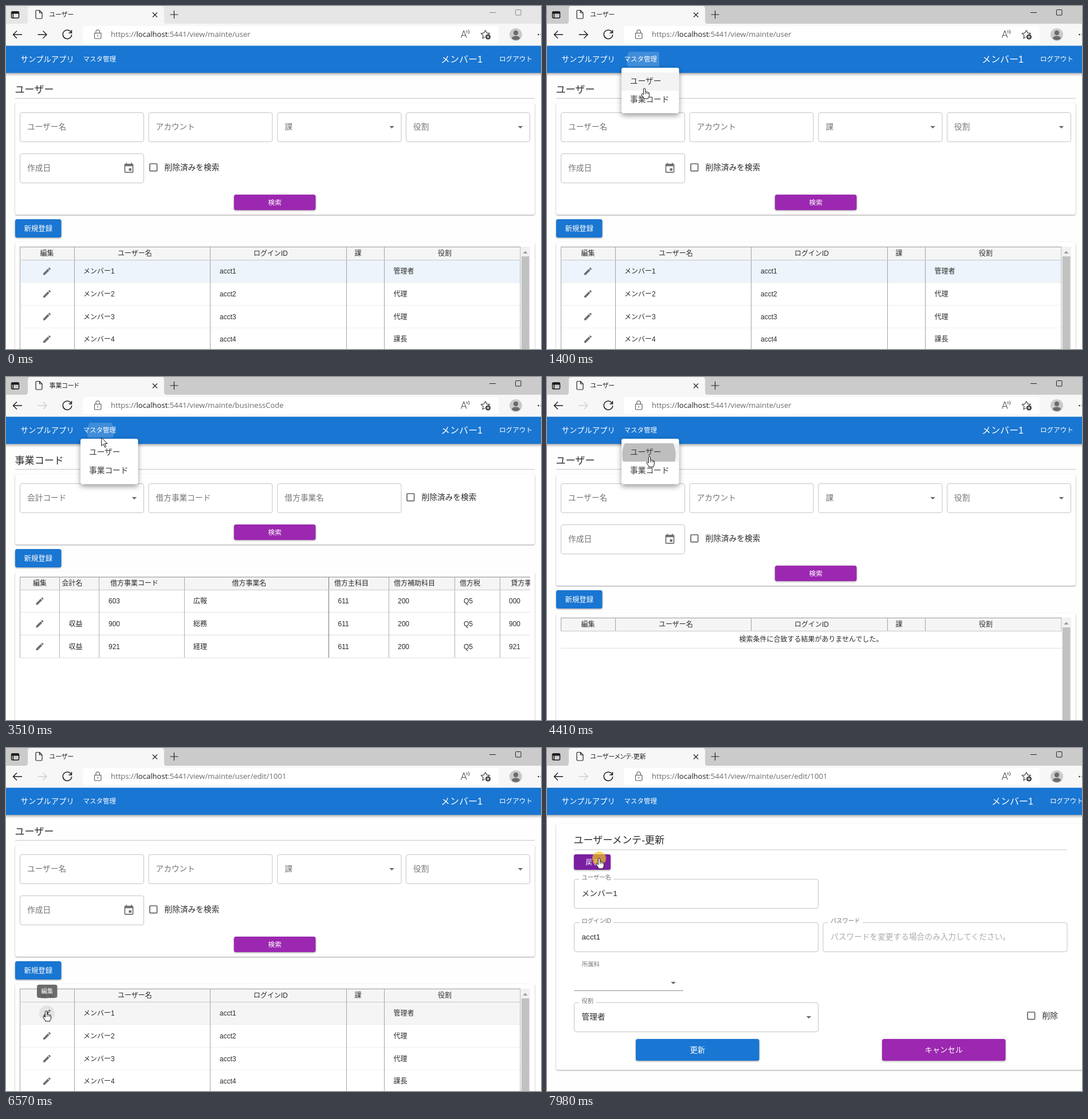
An HTML page for the animation above (8000 ms loop, 934 by 600 pixels).

```html
<!DOCTYPE html>
<html lang="ja">
<head>
<meta charset="utf-8">
<style>
html, body { margin: 0; width: 100%; height: 100%; overflow: hidden; background: #fff; }
svg { display: block; width: 934px; height: 600px; }
text { font-family: "Liberation Sans", "Noto Sans CJK JP", "Noto Sans CJK", sans-serif; white-space: pre; }
.ui { font-family: "Open Sans", "Noto Sans CJK JP", "Noto Sans CJK", sans-serif; }
.tab { font-feature-settings: "palt"; }
.mid { text-anchor: middle; }
.bold { font-weight: 500; }
.card { fill: #fff; filter: drop-shadow(0 1px 1.3px rgba(0,0,0,.38)); }
.btn { filter: drop-shadow(0 1.5px 1.5px rgba(0,0,0,.4)); }
.bar { filter: drop-shadow(0 2px 2.5px rgba(0,0,0,.4)); }
.pop { filter: drop-shadow(0 4px 5px rgba(0,0,0,.4)); }
</style>
</head>
<body>
<svg id="stage" viewBox="0 0 934 600" xmlns="http://www.w3.org/2000/svg"></svg>
<script>
const LOOP = 8000;
const BLUE = '#1976d2', PURPLE = '#9c27b0';
const PEN = 'M3 17.25V21h3.75L17.81 9.94l-3.75-3.75L3 17.25zM20.71 7.04c.39-.39.39-1.02 0-1.41l-2.34-2.34c-.39-.39-1.02-.39-1.41 0l-1.83 1.83 3.75 3.75 1.83-1.83z';
const CAL = 'M17 12h-5v5h5v-5zM16 1v2H8V1H6v2H5c-1.11 0-1.99.9-1.99 2L3 19c0 1.1.89 2 2 2h14c1.1 0 2-.9 2-2V5c0-1.1-.9-2-2-2h-1V1h-2zm3 18H5V8h14v11z';
const zones = [];

const text = (x, cy, size, s, fill = '#2b2b2b', cls = '') =>
  `<text x="${x}" y="${cy + size * .37}" font-size="${size}" fill="${fill}" class="${cls}">${s}</text>`;
const rect = (x, y, w, h, fill, more = '') =>
  `<rect x="${x}" y="${y}" width="${w}" height="${h}" fill="${fill}" ${more}/>`;
const path = (d, stroke, w = 1, more = '') =>
  `<path d="${d}" fill="none" stroke="${stroke}" stroke-width="${w}" ${more}/>`;
const hline = (x1, x2, y, c) => path(`M${x1} ${y}H${x2}`, c);
const vline = (x, y1, y2, c) => path(`M${x} ${y1}V${y2}`, c);
const group = (id, body, more = '') => `<g id="${id}" ${more}>${body}</g>`;
const card = (x, y, w, h) => rect(x, y, w, h, '#fff', 'rx="3.5" class="card"');
const caret = (x, y) => `<path d="M${x - 4.3} ${y - 2}h8.6l-4.3 4.3z" fill="#6b6b6b"/>`;
const icon = (d, x, y, k, ox = 12, oy = 12) =>
  `<path d="${d}" fill="#6f6f6f" transform="translate(${x} ${y}) scale(${k}) translate(${-ox} ${-oy})"/>`;
const pen = (x, y) => icon(PEN, x, y, .72);
const check = (x, y, label) =>
  rect(x + 1, y + 1, 12.6, 12.6, 'none', 'rx="1" stroke="#636363" stroke-width="1.7"') +
  text(x + 26.5, y + 6.5, 13.7, label);

// Interactive parts register themselves so that the pointer can find them.
function zone(page, x, y, w, h, kind, attr, normal, over) {
  zones.push({ page, x, y, w, h, kind, attr, normal, over });
  return `id="z${zones.length - 1}"`;
}
function field(page, x, y, w, label, kind) {
  const id = zone(page, x, y, w, 52, kind, 'stroke', '#c4c4c4', '#262626');
  return rect(x + .5, y + .5, w - 1, 51, '#fff', `rx="3.5" stroke="#c4c4c4" ${id}`) +
    text(x + 13, y + 25, 13.7, label, '#757575') +
    (kind === 'hand' ? caret(x + w - 17, y + 26) : '');
}
function filled(page, x, y, w, label, value, kind, fill = '#2b2b2b') {
  const id = zone(page, x, y, w, 52, kind, 'stroke', '#c4c4c4', '#262626');
  const gap = [...label].reduce((n, c) => n + (c < 'z' ? 5 : 10.3), 0) + 9;
  return rect(x + .5, y + .5, w - 1, 51, '#fff', `rx="3.5" stroke="#c4c4c4" ${id}`) +
    rect(x + 9, y - 2, gap, 5, '#fff') + text(x + 13.5, y - 2.5, 10.3, label, '#757575') +
    text(x + 13.5, y + 25, 13.7, value, fill) +
    (kind === 'hand' ? caret(x + w - 17, y + 26) : '');
}
function button(page, x, y, w, h, label, color, size) {
  const over = color === BLUE ? '#1565c0' : '#7b1fa2';
  const id = zone(page, x, y, w, h, 'hand', 'fill', color, over);
  return rect(x, y, w, h, color, `rx="3.5" class="btn" ${id}`) +
    text(x + w / 2, y + h / 2 + .3, size, label, '#fff', 'mid bold');
}
const heading = s => text(15.5, 146, 17.1, s) + hline(16, 923, 161.5, '#c6c6c6');
const NONE = '検索条件に合致する結果がありませんでした。';

function userPage() {
  const P = 'user', cols = [24.5, 119.5, 356.5, 594.5, 660.5, 898];
  let rows = '';
  ['管理者', '代理', '代理', '課長'].forEach((role, i) => {
    const top = 444.5 + i * 39.6, cy = top + 19.5;
    rows += rect(24, top, 874, 39.6, '#fff', `id="row${i}"`) + hline(24, 898, top + 39.6, '#e0e0e0') +
      (i ? '' : `<circle id="halo" cx="71.5" cy="464" r="13.5" fill="#e3e3e3"/>`) + pen(71.5, cy) +
      text(135, cy, 12, `メンバー${i + 1}`) + text(373, cy, 12, `acct${i + 1}`) + text(676.5, cy, 12, role);
  });
  rows += cols.map(x => vline(x, 444, 600, '#a2a2a2')).join('');
  const heads = [[71.5, '編集'], [225, 'ユーザー名'], [462, 'ログインID'], [614.5, '課'], [766, '役割']];
  return heading('ユーザー') + card(16, 170, 907, 195) +
    field(P, 24, 186, 217, 'ユーザー名', 'beam') + field(P, 248.5, 186, 217, 'アカウント', 'beam') +
    field(P, 473.5, 186, 217, '課', 'hand') + field(P, 698, 186, 217, '役割', 'hand') +
    field(P, 24, 258, 217, '作成日', 'beam') + icon(CAL, 214.5, 283, .88, 12, 11) +
    check(250, 275, '削除済みを検索') +
    button(P, 398, 330, 142.5, 27, '検索', PURPLE, 11.8) +
    button(P, 16, 373, 80.5, 32, '新規登録', BLUE, 12.4) +
    card(16, 413, 907, 220) + rect(24, 421, 874, 23.5, '#f5f5f5') +
    group('userRows', rows) +
    group('userNone', text(461, 459, 12, NONE, '#2b2b2b', 'mid') + hline(24, 898, 474.5, '#e0e0e0')) +
    heads.map(([x, s]) => text(x, 433, 12, s, '#2b2b2b', 'mid')).join('') +
    hline(24, 898, 421.5, '#9a9a9a') + hline(24, 898, 444.5, '#c8c8c8') +
    cols.map(x => vline(x, 421, 444, '#a2a2a2')).join('') +
    rect(898.5, 421, 16.5, 179, '#f1f1f1') + rect(900, 438, 13.5, 162, '#c1c1c1') +
    '<path d="M902.5 433l4-4.5 4 4.5z" fill="#9a9a9a"/>' +
    group('tip', rect(54, 414, 35.5, 23, '#616161', 'rx="3.5" fill-opacity=".93"') +
      text(71.7, 425, 10.5, '編集', '#fff', 'mid bold'));
}

function codePage() {
  const P = 'code', cols = [24.5, 93.5, 162.5, 311.5, 563.5, 668.5, 783.5, 862.5];
  const heads = [[47, '編集'], [97.5, '会計名'], [182, '借方事業コード'], [394.5, '借方事業名'],
    [573, '借方主科目'], [677, '借方補助科目'], [792, '借方税'], [881.5, '貸方事業コード']];
  const left = [109.5, 179, 327, 579.5, 684, 799, 878];
  let rows = '';
  [['', '603', '広報', '000'], ['収益', '900', '総務', '900'], ['収益', '921', '経理', '921']].forEach((r, i) => {
    const cy = 392 + i * 39.7;
    rows += hline(24, 915, cy + 19.8, '#dedede') + pen(59, cy);
    [r[0], r[1], r[2], '611', '200', 'Q5', r[3]].forEach((s, k) => rows += text(left[k], cy, 12, s));
  });
  rows += cols.map((x, i) => vline(x, 372, 491, i === 4 ? '#777' : '#b0b0b0')).join('');
  return heading('事業コード') + card(16, 170, 907, 123) +
    field(P, 24, 186, 217, '会計コード', 'hand') + field(P, 248.5, 186, 217, '借方事業コード', 'beam') +
    field(P, 473.5, 186, 217, '借方事業名', 'beam') + check(699, 203, '削除済みを検索') +
    button(P, 398, 258, 142.5, 27, '検索', PURPLE, 11.8) +
    button(P, 16, 301, 80.5, 32, '新規登録', BLUE, 12.4) +
    card(16, 341, 907, 290) +
    group('codeTable', rect(24, 349.5, 891, 22.5, '#f5f5f5') + group('codeRows', rows) +
      group('codeNone', text(540.5, 387, 12, NONE) + hline(24, 915, 401.5, '#d8d8d8') + vline(24.5, 372, 402, '#d0d0d0')) +
      heads.map(([x, s]) => text(x, 361, 12, s)).join('') +
      hline(24, 915, 350, '#8a8a8a') + hline(24, 915, 372.5, '#c8c8c8') +
      cols.map((x, i) => vline(x, 350, 372, i === 4 ? '#777' : '#a8a8a8')).join(''),
      'clip-path="url(#tableClip)"');
}

function editPage() {
  const P = 'edit';
  const dept = zone(P, 47, 386, 191, 39, 'hand', 'stroke', '#8c8c8c', '#212121');
  return card(16, 133, 940, 430) + text(46.5, 161, 17.1, 'ユーザーメンテ-更新') + hline(47, 908, 178, '#c6c6c6') +
    button(P, 47, 186, 64, 27, '戻る', PURPLE, 11.8) +
    filled(P, 47, 229, 427, 'ユーザー名', 'メンバー1', 'beam') +
    filled(P, 47, 305, 427, 'ログインID', 'acct1', 'beam') +
    filled(P, 481.5, 305, 427, 'パスワード', 'パスワードを変更する場合のみ入力してください。', 'beam', '#ababab') +
    text(61, 378, 10.3, '所属科', '#757575') + path('M47 424.5H238', '#8c8c8c', 1, dept) + caret(220.5, 411) +
    filled(P, 47, 445, 427, '役割', '管理者', 'hand') + check(838, 461, '削除') +
    button(P, 155, 509, 215.5, 38, '更新', BLUE, 13.3) +
    button(P, 585, 509, 215.5, 38, 'キャンセル', PURPLE, 13.3);
}

const header = rect(-4, 60, 942, 57, BLUE, 'class="bar"') +
  text(25.5, 93, 13.4, 'サンプルアプリ', '#fff') +
  `<circle id="glow" cy="95" fill="#fff" opacity=".17" clip-path="url(#navClip)"/>` +
  text(134.5, 93, 11.5, 'マスタ管理', '#fff') +
  group('right', text(759, 93, 16, 'メンバー1', '#fff') + text(861, 93, 11.6, 'ログアウト', '#fff'));

const browser = rect(0, 0, 934, 31, '#cbcbcb', 'id="strip"') + rect(0, 31, 934, 38.5, '#f7f7f7') +
  '<path d="M34 31Q38 31 38 26V5Q38 0 43 0H271Q276 0 276 5V26Q276 31 280 31Z" fill="#f7f7f7"/>' +
  rect(9.5, 10, 13, 11, 'none', 'rx="2" stroke="#1b1b1b" stroke-width="1.5"') +
  rect(9, 9.5, 14, 4, '#1b1b1b', 'rx="1.5"') + rect(11.7, 13, 1.5, 8, '#1b1b1b') +
  path('M53 7.5H58.5L63 12V20.5Q63 22 61.5 22H53.5Q52 22 52 20.5V9Q52 7.5 53 7.5ZM58.5 7.5V12H63', '#222', 1.2) +
  '<text id="title" x="75.5" y="18.5" font-size="11" fill="#222" class="ui tab"></text>' +
  path('M256 11.5l8 8m0-8l-8 8', '#222', 1.2) + path('M286.5 15h14m-7-7v14', '#222', 1.2) +
  group('win', path('M844 11.5H855', 'currentColor') + rect(889.5, 6.5, 9.5, 9.5, 'none', 'rx="1" stroke="currentColor"')) +
  path('M28 50H12.5M19 43.5L12.5 50L19 56.5', '#1e1e1e', 1.4) +
  path('M55.5 50H71M64.5 43.5L71 50L64.5 56.5', '#1e1e1e', 1.4, 'id="next"') +
  path('M114 46.5A7.7 7.7 0 1 0 114.7 50M114.5 42V47H109.5', '#1e1e1e', 1.5) +
  rect(134.5, 35, 725.5, 30, '#fff', 'rx="3.5"') +
  path('M155 47.5H165.5Q166 47.5 166 48V55.5Q166 57 164.5 57H156Q154.5 57 154.5 55.5V48Q154.5 47.5 155 47.5ZM157 47.5V45A3.2 3.2 0 0 1 163.4 45V47.5', '#555', 1.1) +
  '<circle cx="160.2" cy="52.2" r="1" fill="#555"/>' +
  `<text x="183" y="54.4" font-size="13.07" fill="#6b6b6b" class="ui">https://<tspan fill="#1f1f1f">localhost</tspan>:5441/view/mainte/<tspan id="url"></tspan></text>` +
  path('M794.5 55.5L799 43.5H799.5L804 55.5M796 51.5H802.5M804 43Q806 45 804.5 47.5M807 41.5Q810 45 807.5 49', '#555', 1.1) +
  path('M837 42.5l2.2 4.6 5 .6-3.6 3.5M836 54.5l-3.9 2 .9-5.1-3.6-3.5 5-.7 2.3-4.7', '#444', 1.2) +
  '<circle cx="841.5" cy="54" r="4.6" fill="#444"/>' + path('M839 54h5m-2.5-2.5v5', '#fff', 1) +
  '<circle cx="890" cy="50" r="11" fill="#cacaca"/><circle cx="890" cy="47" r="4.2" fill="#6d6a68"/>' +
  '<path d="M883 57Q883 52.5 890 52.5T897 57Q894 59.8 890 59.8T883 57Z" fill="#6d6a68"/>' +
  '<circle cx="929.5" cy="50" r="1.2" fill="#222"/><circle cx="934.5" cy="50" r="1.2" fill="#222"/>';

const menu = rect(130, 108, 100.5, 79.5, '#fff', 'rx="3.5" class="pop"') +
  rect(130, 0, 100.5, 32, '#f3f3f3', 'id="item"') +
  '<circle id="wave" fill="#000" opacity=".22" clip-path="url(#menuClip)"/>' +
  text(145, 131, 13.7, 'ユーザー', '#3a3a3a') + text(145, 163, 13.7, '事業コード', '#3a3a3a');

const pointer =
  '<circle id="click" r="12" fill="#f2c81e" opacity=".68"/>' + group('cursor',
    group('arrow', '<path d="M0 0V14.5L3.4 11.4L5.8 17L8 16L5.6 10.6H10.2Z" fill="#fff" stroke="#111"/>') +
    group('hand', '<path d="M-1.6 11V1.4Q-1.6 0 0 0T1.6 1.4V6.2Q3 5 4.2 6.6Q5.8 5.6 6.6 7.2Q8.4 6.6 8.4 8.6V12.5Q8.4 15 6.8 16.6V18H-1.2V16.6L-4.8 11.6Q-5.6 9.6 -3.6 9.4Z" fill="#fff" stroke="#111"/>' +
      path('M1.6 6.5V10M4.2 7V10M6.6 7.5V10', '#111', .8)) +
    group('beam', path('M-3 -8H-.8L0 -7.2L.8 -8H3M0 -7.2V7.2M-3 8H-.8L0 7.2L.8 8H3', '#111', 1.1)));

document.getElementById('stage').innerHTML =
  `<defs><clipPath id="navClip">${rect(129, 80, 67, 26, '#000', 'rx="3"')}</clipPath>
  <clipPath id="menuClip">${rect(130, 148, 100.5, 32, '#000', 'id="waveBox"')}</clipPath>
  <clipPath id="tableClip">${rect(24, 349, 891, 251, '#000')}</clipPath></defs>` +
  rect(0, 0, 934, 600, '#fefefe') + group('user', userPage()) + group('code', codePage()) + group('edit', editPage()) +
  header + browser + group('menu', menu) + pointer;

const $ = id => document.getElementById(id);
const show = (id, on) => $(id).style.display = on ? '' : 'none';
const set = (id, o) => { for (const k in o) $(id).setAttribute(k, o[k]); };
const clamp = v => Math.max(0, Math.min(1, v));
const ramp = (t, a, b) => clamp((t - a) / (b - a));
const within = (t, a, b) => t >= a && t < b;
const inBox = (p, x, y, w, h) => p.x >= x && p.x <= x + w && p.y >= y && p.y <= y + h;
const spread = (r, dt, k) => r * (1 - Math.exp(-Math.max(0, dt) / k));

// start, end, control point, end point
const moves = [
  [130, 870, 500, 330, 165, 109], [930, 1010, 168, 100, 168, 95],
  [1130, 1380, 172, 120, 170, 144], [1480, 1740, 170, 155, 167, 161],
  [2530, 3290, 168, 120, 164, 88], [3390, 3660, 167, 109, 171, 131],
  [3660, 4130, 175, 134, 178, 136], [4340, 4670, 182, 150, 184, 165],
  [5270, 6030, 160, 330, 95, 437], [6080, 6280, 80, 450, 70, 460],
  [7100, 7850, 110, 330, 91, 193]
];
const clicks = [[1000, 1100], [1800, 1930], [3350, 3460], [4200, 4320], [6400, 6510], [7970, 8000]];

function position(t) {
  let x = 824, y = 572;
  for (const [a, b, cx, cy, ex, ey] of moves) {
    if (t < a) break;
    const u = ramp(t, a, b), s = u * u * (3 - 2 * u), q = 1 - s;
    x = q * q * x + 2 * q * s * cx + s * s * ex;
    y = q * q * y + 2 * q * s * cy + s * s * ey;
  }
  return { x, y };
}

function draw(t) {
  const p = position(t);
  const page = t < 1950 ? 'user' : t < 4340 ? 'code' : t < 6640 ? 'user' : 'edit';
  const first = t < 2500, active = t >= 1000;
  ['user', 'code', 'edit'].forEach(id => show(id, id === page));
  $('title').textContent = { user: 'ユーザー', code: '事業コード', edit: 'ユーザーメンテ-更新' }[page];
  $('url').textContent = page === 'code' ? 'businessCode' : t < 6520 ? 'user' : 'user/edit/1001';
  set('next', { stroke: t < 1950 ? '#1e1e1e' : '#cfcfcf' });
  set('strip', { fill: active ? '#cbcbcb' : '#e6e6e6' });
  $('win').style.color = active ? '#222' : '#8c8c8c';
  set('right', { transform: `translate(${page === 'edit' ? 17 : 0} 0)` });

  const codeReady = t >= 2270, userReady = t < 1950 || t >= 4520;
  show('codeRows', codeReady); show('codeNone', !codeReady);
  show('userRows', userReady); show('userNone', !userReady);

  const open = first ? ramp(t, 1060, 1220) * (1 - ramp(t, 2170, 2320))
                     : ramp(t, 3370, 3510) * (1 - ramp(t, 4440, 4620));
  show('menu', open > 0);
  set('menu', { opacity: open, transform: `translate(180 108) scale(${.9 + .1 * open}) translate(-180 -108)` });
  const nth = p.y >= 148 ? 1 : 0, onItem = open > 0 && inBox(p, 130, 116, 100, 64);
  show('item', onItem);
  set('item', { y: 116 + nth * 32 });
  const press = first ? 1800 : 4200;
  set('waveBox', { y: first ? 148 : 116 });
  set('wave', { cx: first ? 167 : 178, cy: first ? 162 : 136, r: spread(60, t - press, 140) });
  const lit = within(t, 1010, 1830) || within(t, 3360, 4230);
  set('glow', { cx: first ? 170 : 165, r: lit ? spread(32, t - (first ? 1010 : 3360), 110) : 0 });

  let kind = onItem || inBox(p, 129, 80, 67, 25.5) ? 'hand' : 'arrow';
  zones.forEach((z, i) => {
    const over = z.page === page && t >= 130 && !open && inBox(p, z.x, z.y, z.w, z.h);
    if (over) kind = z.kind;
    set('z' + i, { [z.attr]: over ? z.over : z.normal });
  });

  const onRow = page === 'user' && t > 6000 && inBox(p, 24, 444, 874, 40);
  const onPen = onRow && Math.hypot(p.x - 71.5, p.y - 464) < 14;
  set('row0', { fill: t < 1950 ? '#edf4fb' : onRow ? '#f5f5f5' : '#fff' });
  show('halo', onPen);
  show('tip', onPen);
  set('tip', { opacity: ramp(t, 6260, 6420) });
  if (onPen) kind = 'hand';

  show('cursor', t >= 130);
  ['arrow', 'hand', 'beam'].forEach(k => show(k, k === kind));
  set('cursor', { transform: `translate(${p.x} ${p.y})` });
  show('click', clicks.some(([a, b]) => within(t, a, b)));
  set('click', { cx: p.x, cy: p.y });
}

function tick() {
  draw(performance.now() % LOOP);
  requestAnimationFrame(tick);
}
tick();
</script>
</body>
</html>
```
